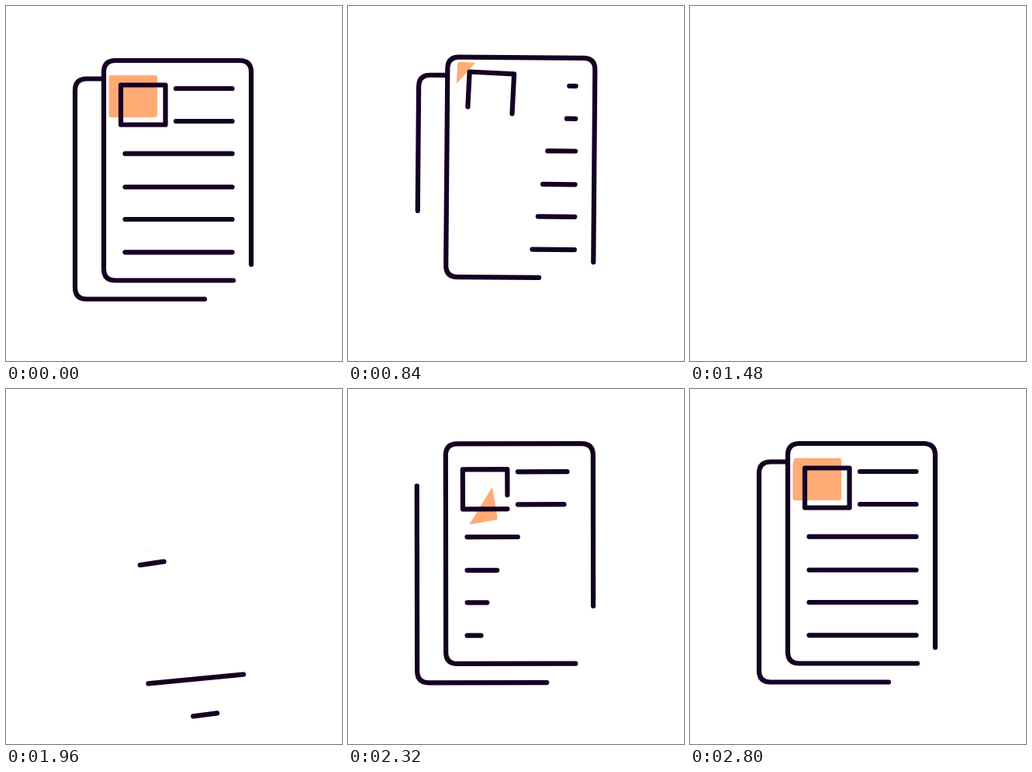
Animation, 433 px wide and 456 px high, one loop 2840 ms. Source, as an HTML page:

```html
<!DOCTYPE html>
<html lang="en">
<head>
<meta charset="utf-8">
<title>Documents</title>
<style>
  html, body { margin: 0; width: 100%; height: 100%; overflow: hidden; background: #fff; }
  svg { display: block; width: 100%; height: 100%; }
  .ink { fill: none; stroke: #150023; stroke-width: 6.2; stroke-linecap: round; stroke-linejoin: round; }
  .tint { fill: #ffab76; }
</style>
</head>
<body>
<svg id="stage" viewBox="0 0 433 456"></svg>
<script>
const LOOP = 2840, STEP = 40;
const stage = document.getElementById('stage');

function add(cls, d) {
  const el = document.createElementNS('http://www.w3.org/2000/svg', 'path');
  el.setAttribute('class', cls);
  el.setAttribute('d', d);
  stage.append(el);
  return el;
}

// Cubic ease in and out between two times
function ease(t, [from, to]) {
  const p = Math.min(1, Math.max(0, (t - from) / (to - from)));
  return p < .5 ? 4 * p ** 3 : 1 - 4 * (1 - p) ** 3;
}

// A move: its time span, then the shift and turn at its far end
const pageLeave = { span: [635, 1500], x: 21.2, y: -72, turn: 9 };
const frontEnter = { span: [1690, 2420], x: 1.9, y: 27.6, turn: -6.9 };
const backEnter = { span: [1690, 2420], x: -3.1, y: 58, turn: -9.2 };
const boxLeave = { span: [506, 2006], x: 166, y: -352, turn: 66 };
const boxEnter = { span: [1673, 2450], x: -6.6, y: 92, turn: -10.3 };
const tintEnter = { span: [1850, 2700], x: -17, y: 85, turn: -27 };
const pageMid = [216, 228];

const tint = {
  el: add('tint', 'M132.5 92 Q132.5 88.7 136 88.7 H192 Q195 88.7 195 92 V140 Q195 143 192 143 H135.5 Q132.5 143 132.5 140 Z'),
  mid: [163.5, 116], leave: boxLeave, enter: tintEnter, erase: [490, 1054], draw: [1720, 3080]
};

function stroke(d, mid, leave, enter, erase, draw) {
  const el = add('ink', d);
  el.setAttribute('pathLength', 1);
  return { el, length: el.getTotalLength(), mid, leave, enter, erase, draw };
}

const strokes = [
  stroke('M124 93.5 H104 Q89 93.5 89 108.5 V361.5 Q89 376.5 104 376.5 H256',
    pageMid, pageLeave, backEnter, [540, 1112], [1747, 2584]),
  stroke('M316 332 V85 Q316 70 301 70 H141 Q126 70 126 85 V337.5 Q126 352.5 141 352.5 H293',
    pageMid, pageLeave, frontEnter, [635, 1500], [1684, 2529]),
  stroke('M205.5 152.5 V101.5 H148 V152.5 H205.5',
    [177, 127], boxLeave, boxEnter, [531, 1270], [1660, 2570]),
  // Text lines: left end, height, erase span, draw span
  ...[
    [219, 106, [400, 1035], [1950, 2489]],
    [219, 148, [462, 1035], [1970, 2513]],
    [153.5, 189.7, [549, 1035], [2020, 2631]],
    [153.5, 232.5, [573, 1035], [2060, 2691]],
    [153.5, 274, [593, 1035], [2085, 2738]],
    [153.5, 316.3, [613, 1035], [2105, 2780]]
  ].map(([x, y, erase, draw]) =>
    stroke(`M291.5 ${y} H${x}`, pageMid, pageLeave, frontEnter, erase, draw))
];

// Outline of the tint, sampled for cutting pieces out of it
const outline = tint.el.getTotalLength(), N = 240;
const rim = tint.el.cloneNode();
function piece(from, to) {
  let d = '';
  for (let i = 0; i <= N; i++) {
    const p = rim.getPointAtLength((from + (to - from) * i / N) % 1 * outline);
    d += (i ? 'L' : 'M') + p.x.toFixed(2) + ' ' + p.y.toFixed(2);
  }
  return d + 'Z';
}

function place(part, t, leaving) {
  const move = leaving ? part.leave : part.enter;
  const q = ease(t, move.span), k = leaving ? q : 1 - q;
  part.el.setAttribute('transform',
    `translate(${move.x * k} ${move.y * k}) rotate(${move.turn * k} ${part.mid})`);
}

function render(now) {
  let t = Math.floor(now % LOOP / STEP) * STEP;
  if (t === 1080) t = 1040; // one step is held
  const leaving = t >= 240 && t < 1560;
  if (t < 240) t += LOOP;   // the tint closes after the loop restarts

  for (const s of strokes) {
    place(s, t, leaving);
    const shown = leaving ? 1 - ease(t, s.erase) : ease(t, s.draw);
    s.el.style.display = shown * s.length > .06 ? '' : 'none';
    s.el.setAttribute('stroke-dasharray', `${shown} 9`);
    s.el.setAttribute('stroke-dashoffset', leaving ? 0 : shown - 1);
  }

  place(tint, t, leaving);
  const half = (leaving ? 1 - ease(t, tint.erase) : ease(t, tint.draw)) / 2;
  const centre = leaving ? 1 : .5;
  tint.el.style.display = half > .005 ? '' : 'none';
  tint.el.setAttribute('d', piece(centre - half, centre + half));
}

function tick() {
  render(performance.now());
  requestAnimationFrame(tick);
}
tick();
</script>
</body>
</html>
```
